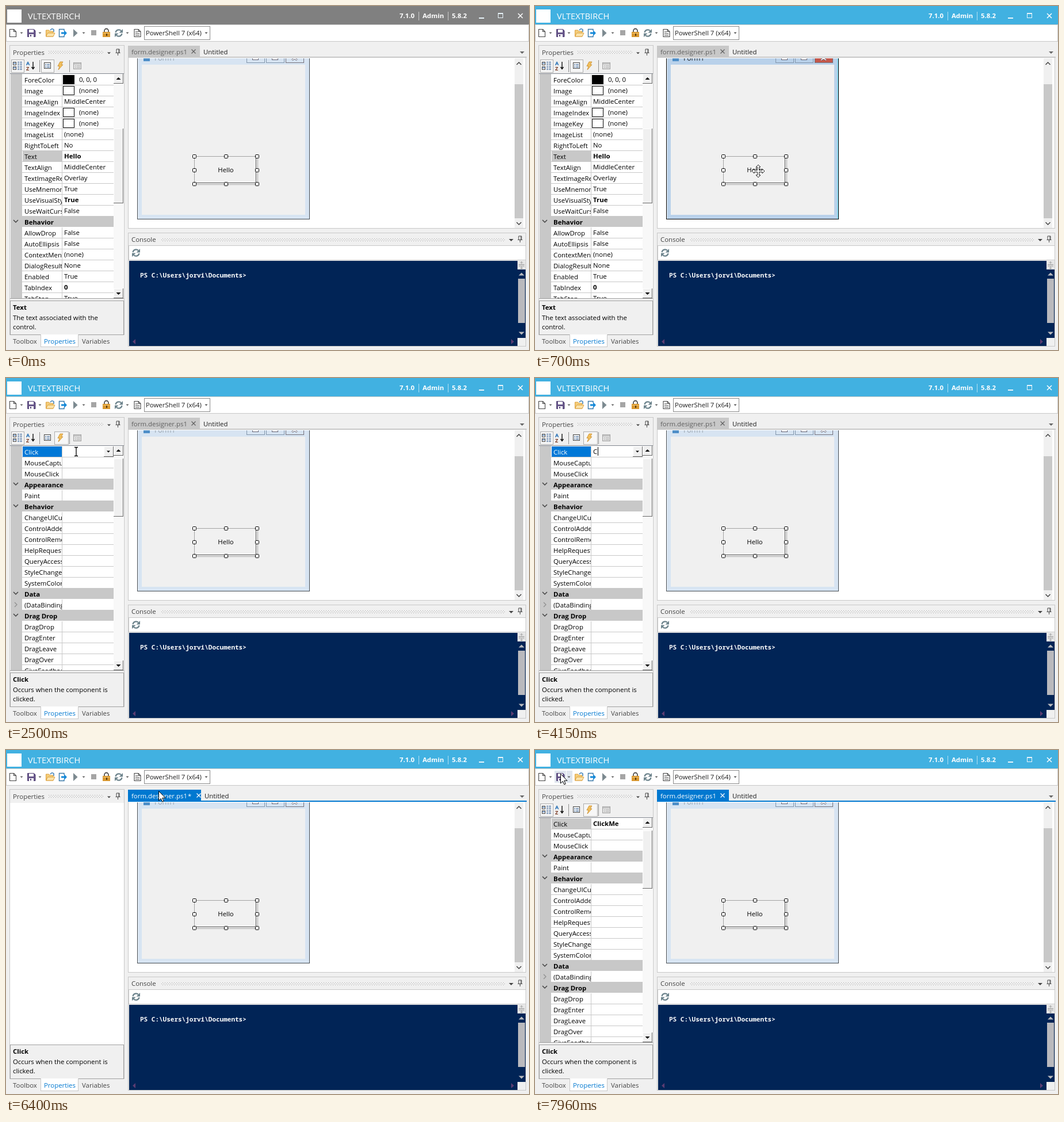
Recreate the animation shown at these times as an HTML page. Size 909 by 598 pixels, loop 8 s.

```html
<!DOCTYPE html>
<html lang="en">
<head>
<meta charset="utf-8">
<title>Form designer</title>
<style>
html, body { margin: 0; width: 100%; height: 100%; overflow: hidden; background: #f0f0f0; }
svg { display: block; }
text { font-family: "Open Sans", "Noto Sans", sans-serif; font-size: 11.4px; white-space: pre; }
rect { shape-rendering: crispEdges; }
</style>
</head>
<body>
<svg id="stage" width="909" height="598" viewBox="0 0 909 598"></svg>
<script>
const LOOP = 8000;
const INK = '#1e1e1e', GRAY = '#c8c8c8', FACE = '#f0f0f0', BLUE = '#0078d0', SKY = '#41b1e1';

// ---- drawing helpers ----
const rect = (x, y, w, h, fill, more = '') =>
  `<rect x="${x}" y="${y}" width="${w}" height="${h}" fill="${fill}" ${more}/>`;
const box = (x, y, w, h, fill, line) =>
  rect(x, y, w, h, line) + rect(x + 1, y + 1, w - 2, h - 2, fill);
const text = (x, y, s, fill = INK, more = '') =>
  `<text x="${x}" y="${y}" fill="${fill}" ${more}>${s}</text>`;
const bold = (x, y, s, fill = '#000', more = '') => text(x, y, s, fill, 'font-weight="700" ' + more);
const path = (d, fill, line = 'none', w = 1, more = '') =>
  `<path d="${d}" fill="${fill}" stroke="${line}" stroke-width="${w}" ${more}/>`;
const group = (id, body, more = '') => `<g id="${id}" ${more}>${body}</g>`;
const drop = (x, y, c = '#444', r = 3) => path(`M${x - r} ${y - r / 2}h${2 * r}l${-r} ${r}z`, c);
const up = (x, y, c = '#444', r = 3) => path(`M${x - r} ${y + r / 2}h${2 * r}l${-r} ${-r}z`, c);
const chevron = (x, y, c = '#444', dir = 1) =>
  path(`M${x - 4} ${y - 2 * dir}l4 ${4 * dir}l4 ${-4 * dir}`, 'none', c, 1.5);
const bevel = (x, y, w, h) =>
  rect(x, y, w, h, '#696969') + rect(x, y, w - 1, h - 1, '#fff') + rect(x + 1, y + 1, w - 2, h - 2, FACE);
const cross = (x, y, r, c, w = 1.2, more = '') =>
  path(`M${x - r} ${y - r}l${2 * r} ${2 * r}M${x + r} ${y - r}l${-2 * r} ${2 * r}`, 'none', c, w, more);
const pin = (x, y) =>
  path(`M${x - 2.5} ${y + 1}v-6h5v6M${x - 4} ${y + 1.5}h8M${x + 1.5} ${y - 5}v6M${x} ${y + 2}v4`, 'none', '#444', 1);
const refresh = (x, y) => group('', path('M-5.5 -1A5.6 5.6 0 0 1 4 -4M5.5 1A5.6 5.6 0 0 1 -4 4', 'none', '#6c838c', 2.2) +
  path('M7 -7v6.5h-6.5zM-7 7v-6.5h6.5z', '#6c838c'), `transform="translate(${x} ${y})"`);

// ---- window frame and toolbar ----
function frame() {
  const bar = '#fff', sep = 'rgba(255,255,255,.6)';
  return rect(0, 0, 909, 598, FACE) + rect(0, 0, 909, 32, SKY, 'id="title"') +
    rect(2, 6, 25, 23, '#fff') +
    text(38, 23, 'VLTEXTBIRCH', bar, 'style="font-size:14.6px"') +
    bold(684, 21, '7.1.0', bar) + bold(724, 21, 'Admin', bar) + bold(775, 21, '5.8.2', bar) +
    rect(717, 10, 1, 15, sep) + rect(768, 10, 1, 15, sep) +
    rect(822, 20, 9, 2, '#e8f4fa') + box(855, 12, 9, 9, 'none', '#e8f4fa') +
    rect(856, 14, 7, 6, SKY, 'id="maxHole"') + cross(894, 17, 4, bar, 1.5) +
    rect(0, 32, 909, 30, GRAY) + rect(1, 33, 907, 28, '#fff');
}

function toolbar() {
  const page = (x, y) => path(`M${x} ${y}h7l4 4v9h-11zM${x + 7} ${y}v4h4`, '#fff', '#444', 1.1);
  return group('saveHover', rect(34, 36, 31, 21, '#dfe6ee') + rect(54, 36, 1, 21, '#fff')) +
    page(6.5, 40.5) + [27, 59, 135, 211].map(x => drop(x, 47, '#555', 2.5)).join('') +
    path('M37.5 40.5h11l2.5 2.5v10.5h-13.5z', '#67568a', '#564678') + rect(40, 41, 8, 5, '#fff') +
    rect(40, 49, 8, 5, '#fff') + rect(42, 50, 2, 3, '#564678') +
    path('M69.5 53v-11h5l1.5 2h6v9z', '#f4cd7a', '#dca03c') + path('M69.5 53l3-6h12.5l-3 6z', '#fae3ac', '#dca03c') +
    path('M77 42q3-4 6-1v4', 'none', '#3c7fb8', 1.5) +
    path('M101 43v-2.5h-8.5v13h8.5v-2.5', '#fff', '#3b79a8', 1.4) +
    path('M96 45.5h5v-3.5l5 5l-5 5v-3.500h-5z', '#1689d8') +
    path('M117 40l7.500 7l-7.500 7z', '#7c8a90') + rect(148, 42, 9, 9, '#a5a5a5') +
    path('M171 46v-3a3.500 3.500 0 0 1 7 0v3', 'none', '#555', 1.8) + rect(168, 45, 13, 9, '#d9982f') +
    rect(169, 47, 11, 1, '#f5ca77') + rect(174, 48, 2, 4, '#563b12') +
    refresh(196, 47) + page(223, 40.5) + path('M225 45h4M225 48h7M225 51h7', 'none', '#444', 1.2) +
    box(240, 35, 115, 24, '#fff', '#8a8a8a') + text(243, 51, 'PowerShell 7 (x64)') + drop(348, 47, '#444', 2.5);
}

// ---- property panel ----
const PROPS = ['ForeColor|#000 0, 0, 0', 'Image|#fff (none)', 'ImageAlign|MiddleCenter', 'ImageIndex|#fff (none)',
  'ImageKey|#fff (none)', 'ImageList|(none)', 'RightToLeft|No', '!Text|Hello', 'TextAlign|MiddleCenter',
  'TextImageRelation|Overlay', 'UseMnemonic|True', 'UseVisualStyle|!True', 'UseWaitCursor|False', '*Behavior',
  'AllowDrop|False', 'AutoEllipsis|False', 'ContextMenu|(none)', 'DialogResult|None', 'Enabled|True',
  'TabIndex|!0', 'TabStop|True'];
const EVENTS = ['Click', 'MouseCaptureChanged', 'MouseClick', '*Appearance', 'Paint', '*Behavior', 'ChangeUICues',
  'ControlAdded', 'ControlRemoved', 'HelpRequested', 'QueryAccessibility', 'StyleChanged', 'SystemColors', '*Data',
  '+(DataBindings)', '*Drag Drop', 'DragDrop', 'DragEnter', 'DragLeave', 'DragOver', 'GiveFeedback'];

function row(item, i) {
  const y = 119 + 19 * i, base = y + 13.5;
  let [name, value = ''] = item.split('|');
  const mark = /^[*!+]/.test(name) ? name[0] : '';
  name = name.slice(mark.length);
  if (mark === '*')
    return rect(28, y - 1, 159, 19, GRAY) + bold(32, base, name) + chevron(17, y + 8);
  let out = rect(29, y, 68, 18, mark === '!' ? GRAY : '#fff') + text(32, base, name, '#000') +
    rect(97, y, 90, 18, '#fff') + rect(97, y, 1, 18, GRAY) + rect(28, y + 18, 159, 1, GRAY);
  if (mark === '+') out += path(`M15 ${y + 5}l4 4l-4 4`, 'none', '#909090', 1.3);
  if (value[0] === '#')
    out += box(99, y + 1, 20, 16, value.slice(0, 4), '#000') + text(127, base - .5, value.slice(5), '#000');
  else if (value[0] === '!' || mark === '!') out += bold(101, base - 1, value.replace('!', ''));
  else out += text(101, base - 1, value, '#000');
  return out;
}

const list = (rows, top, height) => rows.map(row).join('') + bevel(187, top, 17, height);

function gridTools() {
  const line = '#8e8e8e';
  const press = (id, x, w) => group(id, box(x, 93, w, 23, '#f7f7f7', '#adadad'));
  return rect(7, 92, 198, 26, FACE) + press('', 9, 23) + press('propsOn', 61, 23) + press('eventsOn', 84, 25) +
    [97, 105].map(y => box(12, y, 6, 6, '#fff', '#444') + rect(13, y + 2, 4, 1, '#2266bb') +
      path(`M20 ${y + .5}h3m1 0h4M20 ${y + 3}h3m1 0h4M20 ${y + 5.5}h3m1 0h4`, 'none', '#335c91')).join('') +
    bold(35, 103, 'A', '#1263b0', 'style="font-size:9px"') + bold(35, 111.500, 'Z', '#7d3b25', 'style="font-size:9px"') +
    path('M47 97v12M44.500 106l2.500 3.500l2.500-3.500', 'none', '#111', 1.4) +
    rect(58, 94, 1, 21, line) + rect(110, 94, 1, 21, line) +
    box(66, 98, 12, 11, '#fff', '#444') + path('M68 101.500h2m1 0h5M68 104h2m1 0h5M68 106.500h2m1 0h5', 'none', '#345f91') +
    path('M94 97h5l-3 5h3l-8 9l2-6.500h-3z', '#f2c05c', '#c78a2d', .8) +
    box(117, 98, 14, 12, '#e2e2e2', '#a0a0a0') + rect(118, 100, 12, 1, '#a0a0a0') +
    path('M120 104h2m1 0h6M120 107h2m1 0h6', 'none', '#a8a8a8');
}

function clickRow() {
  return group('editRow', rect(29, 119, 68, 18, '#0078d7') + text(32, 132.500, 'Click', '#fff') +
      text(101, 131.500, '', '#000', 'id="typed"') + rect(101, 120, 1, 15, '#000', 'id="caret"') +
      bevel(170, 119, 17, 18) + drop(178, 128, '#000', 3)) +
    group('doneRow', rect(29, 119, 68, 18, GRAY) + text(32, 132.500, 'Click', '#000') + bold(101, 131.500, 'ClickMe'));
}

const help = (id, head, a, b) => group(id, bold(12, 528, head) + text(12, 546, a, '#000') + text(12, 562, b, '#000'));

function panel() {
  return box(6, 68, 200, 504, '#fff', GRAY) + rect(7, 69, 198, 23, FACE) +
    text(12, 85, 'Properties', '#444') + rect(74, 77, 96, 6, 'url(#grip)') + drop(179, 82) + pin(194.500, 80) +
    group('grid', gridTools() + rect(7, 117, 198, 1, '#828790') + rect(8, 118, 20, 391, GRAY) +
      rect(28, 118, 159, 391, '#fff') + rect(187, 118, 17, 391, '#f8f8f8') +
      group('props', list(PROPS, 213, 130)) + group('events', list(EVENTS, 140, 101) + clickRow()) +
      bevel(187, 118, 17, 17) + up(195.500, 126, '#000', 4) + bevel(187, 491, 17, 17) + drop(195.500, 500, '#000', 4) +
      rect(7, 508, 198, 1, '#a0a0a0') + rect(7, 509, 198, 10, FACE)) +
    box(7, 512, 198, 60, FACE, '#a0a0a0') +
    help('helpText', 'Text', 'The text associated with the', 'control.') +
    help('helpClick', 'Click', 'Occurs when the component is', 'clicked.') +
    rect(6, 572, 200, 24, FACE) + box(60, 571, 66, 22, '#fff', GRAY) + rect(61, 571, 64, 2, '#fff') +
    text(12, 587, 'Toolbox', '#444') + text(66, 587, 'Properties', BLUE) + text(132, 587, 'Variables', '#444');
}

// ---- designer ----
function formFrame(id, edge, skin, glow, ink, close) {
  const cap = (x, fill, line) => rect(x, 84, 32, 15, line) + rect(x + 1, 84, 30, 14, fill);
  return group(id, rect(228, 80, 300, 291, edge) + rect(229, 80, 298, 290, skin) +
    rect(525, 80, 2, 290, glow) + rect(229, 80, 1, 290, '#eef6fc') +
    rect(239, 85, 11, 11, '#4f8fc8') + text(258, 95, 'Form1', ink, 'style="font-size:12px"') +
    cap(418, skin, '#8296ac') + cap(452, skin, '#8296ac') + cap(486, close, '#76727c') +
    box(428, 87, 11, 7, '#fff', '#667') + box(462, 87, 11, 7, '#fff', '#667') +
    path('M497 88l9 6M506 88l-9 6', 'none', '#667', 3) + path('M497 88l9 6M506 88l-9 6', 'none', '#fff', 1.5));
}

function designer() {
  const knobs = [];
  for (const x of [327, 382, 436]) for (const y of [261, 285, 309])
    if (x !== 382 || y !== 285)
      knobs.push(`<rect x="${x - 2.5}" y="${y - 2.5}" width="6" height="6" rx="1" fill="#fff" stroke="#000" style="shape-rendering:auto"/>`);
  return box(212, 88, 692, 299, '#fff', GRAY) +
    `<g clip-path="url(#view)">` +
    formFrame('formOff', '#444b52', '#d7e4f2', '#d7e4f2', '#9aa3ad', '#d7e4f2') +
    formFrame('formOn', '#000', '#b9d1ea', '#8fdcf0', '#222', '#c4574a') +
    rect(236, 102, 284, 261, FACE) + '</g>' +
    rect(327, 261, 110, 49, '#f1f1f1', 'stroke="#555" stroke-dasharray="1 1" transform="translate(.5 .5)"') +
    rect(434, 263, 1, 45, '#555') + rect(329, 307, 106, 1, '#555') +
    text(382, 289, 'Hello', '#000', 'text-anchor="middle"') + knobs.join('') +
    rect(884, 91, 15, 295, FACE) + rect(884, 136, 15, 233, GRAY) + chevron(891.500, 100, '#444', -1) + chevron(891.500, 378);
}

function tabs() {
  return rect(212, 68, 693, 20, FACE) + rect(212, 69, 125, 20, GRAY, 'id="tab"') +
    rect(212, 88, 693, 2, GRAY, 'id="tabLine"') +
    text(218, 83.500, 'form.designer.ps1', '#606060', 'id="tabText"') + text(316, 83.500, '*', '#fff', 'id="star"') +
    group('tabClose', cross(0, 0, 3.5, 'currentColor', 1.2)) +
    text(343, 83.500, 'Untitled', INK, 'id="other"') + drop(897, 81, '#666', 4);
}

function consolePane() {
  const violet = '#5b3c72', pale = '#b9b9bd';
  return box(212, 394, 692, 198, FACE, GRAY) + text(218, 410, 'Console', '#444') +
    rect(270, 403, 597, 6, 'url(#grip)') + drop(878, 407, '#444', 4) + pin(893.500, 405) +
    box(213, 416, 691, 26, '#fff', GRAY) + refresh(226, 429) +
    rect(214, 443, 689, 148, '#012456') +
    text(233, 472, 'PS C:\\Users\\jorvi\\Documents&gt;', '#fff',
      'style="font:600 11px \'Noto Sans Mono\',\'DejaVu Sans Mono\',monospace"') +
    rect(889, 443, 14, 15, '#e6e6e6') +
    path('M891 449.500h10M891 452h10M896 444.500v4M896 453v4M894 446.500l2-2l2 2M894 455l2 2l2-2', 'none', '#999') +
    up(896, 466, pale, 5) + rect(890, 474, 12, 77, pale) + drop(896, 569, pale, 5) +
    rect(889, 577, 14, 14, FACE) +
    path('M225 579v9l-5-4.500z', violet) + path('M878 579v9l5-4.500z', violet);
}

const pointers = group('arrow', path('M.5 .5V17L4.300 13.300L6.800 19L9.200 18L6.800 12.300H12Z', '#fff', '#000')) +
  group('mover', path('M0-11L4-7H1.500V-1.500H7V-4L11 0L7 4V1.500H1.500V7H4L0 11L-4 7H-1.500V1.500H-7V4L-11 0L-7-4V-1.500H-1.500V-7H-4Z', '#fff', '#222')) +
  group('beam', path('M-3 -7.500h2l1 1l1-1h2M-3 7.500h2l1-1l1 1h2M0-6.500v13', 'none', 'currentColor', 1.3));

document.getElementById('stage').innerHTML =
  `<defs><pattern id="grip" width="4" height="4" patternUnits="userSpaceOnUse">
    <rect width="1" height="1" fill="#a8a8a8"/><rect x="2" y="2" width="1" height="1" fill="#a8a8a8"/></pattern>
    <clipPath id="view"><rect x="213" y="91" width="671" height="295"/></clipPath></defs>` +
  frame() + toolbar() + panel() + designer() + tabs() + consolePane() +
  group('tip', box(99, 138, 40, 19, '#fff', '#767676') + text(102, 151.500, 'Events', '#575757', 'style="font-size:11px"')) +
  pointers;

// ---- motion ----
const el = {};
document.querySelectorAll('[id]').forEach(n => { el[n.id] = n; });
const show = (id, on) => { el[id].style.display = on ? '' : 'none'; };
const set = (id, key, v) => el[id].setAttribute(key, v);
const clamp = v => Math.max(0, Math.min(1, v));
const ease = u => u * u * (3 - 2 * u);

// start, end, target x, target y
const MOVES = [[70, 560, 388, 287], [1010, 1620, 99, 106], [2200, 2500, 122, 128], [3450, 3520, 141, 130],
  [6010, 6330, 265, 71], [6780, 6860, 269, 82], [7580, 7930, 44, 41]];
const KEYS = [4150, 4300, 4450, 4530, 4700, 5080, 5230];
const STOPS = [101, 109, 112, 115, 121, 127, 138, 144];

function pointerAt(t) {
  let x = 715, y = 493;
  for (const [a, b, tx, ty] of MOVES) {
    const u = ease(clamp((t - a) / (b - a)));
    x += (tx - x) * u;
    y += (ty - y) * u;
  }
  return [Math.round(x), Math.round(y)];
}

function drawPointer(t) {
  const [x, y] = pointerAt(t);
  const hidden = t < 70 || (t >= 2820 && t < 3450) || (t >= 4150 && t < 6010);
  const inConsole = y > 443;
  const inCell = t > 2200 && t < 6400 && x > 98 && x < 170 && y > 118 && y < 138;
  const onButton = x > 327 && x < 437 && y > 261 && y < 309;
  const kind = inConsole || inCell ? 'beam' : onButton ? 'mover' : 'arrow';
  for (const id of ['arrow', 'mover', 'beam']) show(id, !hidden && id === kind);
  set(kind, 'transform', `translate(${x} ${y})`);
  el.beam.style.color = inConsole ? '#01173c' : '#000';
  show('saveHover', t > 7500 && x < 65 && y < 58);
  show('eventsOn', t >= 1800 || (t > 1010 && x < 109 && y < 116));
}

function draw(t) {
  const active = t >= 630, events = t >= 1800, clicked = t >= 6400, back = t >= 6630;
  set('title', 'fill', active ? SKY : '#808080');
  set('maxHole', 'fill', active ? SKY : '#808080');
  show('formOn', active && !events);
  show('formOff', !active || events);

  show('grid', !clicked || back);
  show('props', !events);
  show('events', events);
  show('propsOn', !events);
  show('helpText', !events);
  show('helpClick', events);
  show('editRow', !back);
  show('doneRow', back);
  show('tip', t >= 1880 && t < 2280);

  const n = KEYS.filter(k => t >= k).length;
  el.typed.textContent = 'ClickMe'.slice(0, n);
  set('caret', 'x', STOPS[n]);
  show('caret', (t >= 3280 && t < 3920) || (t >= 4150 && t < 5780));

  const dirty = clicked && t < 7180;
  const extra = clicked ? 2 * (1 - clamp((t - 7180) / 230)) : 0;
  set('tab', 'width', 125 + (dirty ? 2 : Math.round(extra)));
  set('tab', 'fill', clicked ? BLUE : GRAY);
  set('tabLine', 'fill', clicked ? BLUE : GRAY);
  set('tabText', 'fill', clicked ? '#fff' : '#606060');
  show('star', dirty);
  set('tabClose', 'transform', `translate(${dirty ? 335 : 326} 79)`);
  el.tabClose.style.color = clicked ? '#fff' : '#606060';
  set('other', 'x', 343 + extra);
  drawPointer(t);
}

function tick() {
  draw(performance.now() % LOOP);
  requestAnimationFrame(tick);
}
tick();
</script>
</body>
</html>
```
